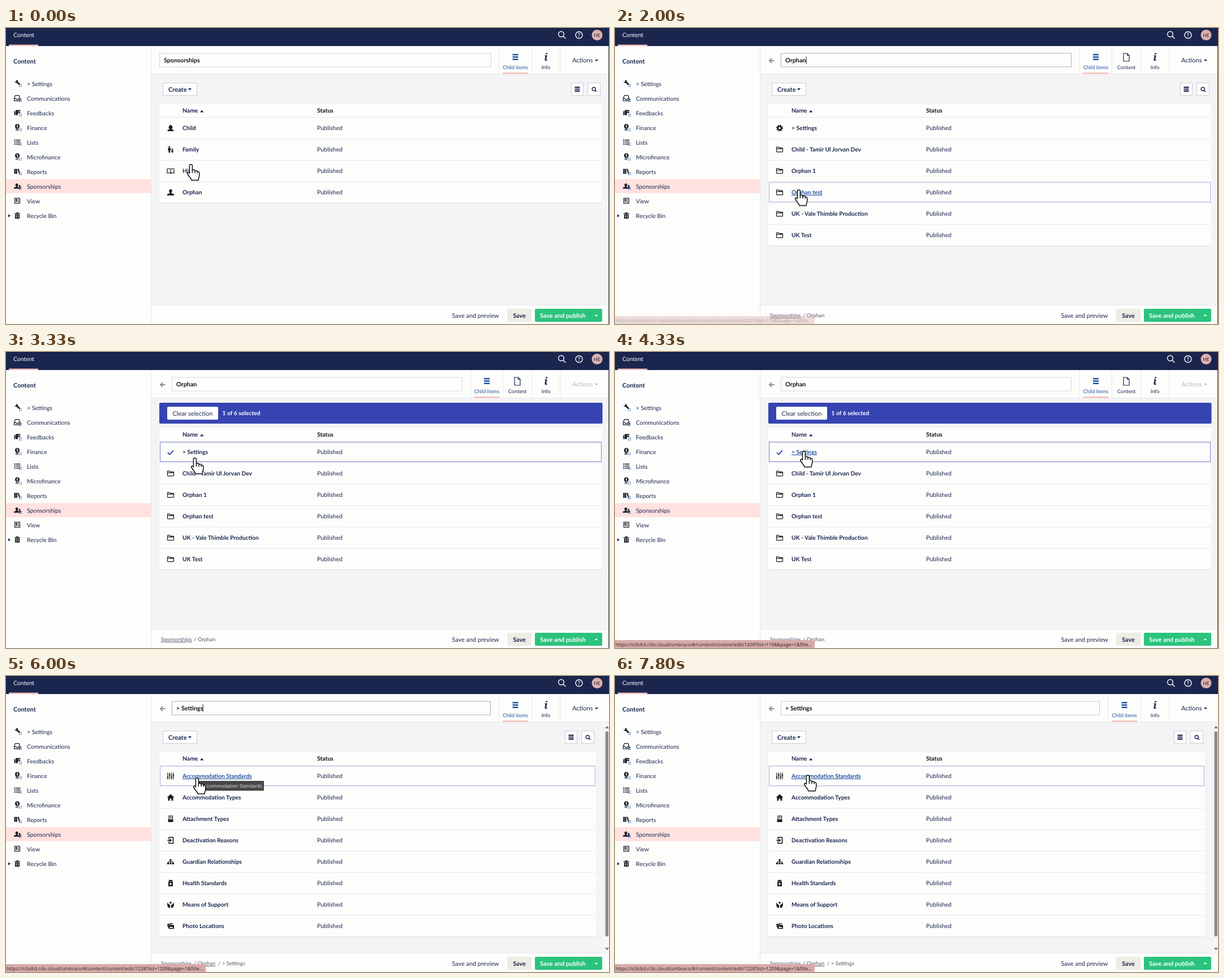
An HTML page that plays this animation: 1066x525 px, repeating every 8000 ms.

```html
<!DOCTYPE html>
<html lang="en">
<head>
<meta charset="utf-8">
<title>Content</title>
<style>
html, body { margin: 0; width: 100%; height: 100%; overflow: hidden; background: #fdfdfc; }
svg { display: block; width: 1066px; height: 525px; }
text { font-family: Lato, sans-serif; fill: #1b264f; text-rendering: geometricPrecision; white-space: pre; }
.b { font-weight: 700; }
.mid { text-anchor: middle; }
.ui { font-family: "Open Sans", "Noto Sans", sans-serif; }
.line { stroke: #e9e8ec; }
.box { fill: #fdfdfc; stroke: #cfced3; }
.input { fill: #fdfdfc; }
.ring { fill: none; stroke: #a8b1e0; visibility: hidden; }
.on .ring { visibility: visible; }
.link .name { fill: #2152a3; text-decoration: underline; }
.o { fill: none; stroke: #1b264f; stroke-width: 1.2; }
.hide { display: none; }
</style>
</head>
<body>
<svg id="stage" viewBox="0 0 1066 525"></svg>
<script>
const $ = id => document.getElementById(id);
const rect = (x, y, w, h, fill, extra = '') =>
  `<rect x="${x}" y="${y}" width="${w}" height="${h}" ${fill ? `fill="${fill}"` : ''} ${extra}/>`;
const text = (x, y, s, size, cls = '', extra = '') =>
  `<text x="${x}" y="${y}" font-size="${size}" class="${cls}" ${extra}>${s}</text>`;
const line = (x1, y1, x2, y2) => `<path class="line" d="M${x1} ${y1}L${x2} ${y2}"/>`;
const path = (d, extra = '') => `<path d="${d}" ${extra}/>`;
const at = (x, y, s, extra = '') => `<g transform="translate(${x} ${y})" ${extra}>${s}</g>`;
const outline = 'fill="none" stroke="#1a1a1f" stroke-width="1.2"';

const person = '<ellipse cy="-2.4" rx="2.7" ry="3.1"/><path d="M-1.5 0h3v1.6l4 1.4q.7 .5 .7 2.4h-12.4q0-1.9 .7-2.4l4-1.4z"/>';
const bars = path('M-4.5-4.5h9v2.2h-9zM-4.5-1.1h9v2.2h-9zM-4.5 2.3h9v2.2h-9z');
const glass = '<circle r="3" cx="-.8" cy="-.8" fill="none" stroke="#1b264f" stroke-width="1.4"/>' +
  path('M1.4 1.4L4 4', 'stroke="#1b264f" stroke-width="1.7"');
const coin = '<circle cy="-2" r="4"/>' + path('M-3 3h5M-3 5h5', 'stroke="#1a1a1f" stroke-width="1.2"') +
  path('M1-3.8h-1.6v1.6h1.6v1.8h-2M0-4.6v5', 'fill="none" stroke="#fdfdfc" stroke-width=".8"');

const icons = {
  person,
  coin,
  wrench: path('M-5-3.6l2 1.4 1.4-1.2-1-2.2q3.6-.4 3.8 3l4.2 4.4-1.9 1.9-4.3-4.3q-3.4 .2-4.2-3z'),
  tray: path('M-3.5-4.5h6.5l2 5.5v4h-10.5v-4zM-5.5 1h3l1 1.8h3l1-1.8h2.5', outline),
  feedback: path('M-5.5-2.5h2v7h-2zM-2.8-4.5h8v2.2h-4.2v1h4.2v2h-4.2v3.8h-3.8z'),
  list: path('M-5.5-4.5h2v2h-2zM-2.5-4.3h8v1.6h-8zM-5.5-1h2v2h-2zM-2.5-.8h8v1.6h-8zM-5.5 2.5h2v2h-2zM-2.5 2.7h8v1.6h-8z'),
  books: path('M-5.5-4.5h2.4v9h-2.4zM-2.5-4.5h2.4v9h-2.4zM.5-4l2.2-.6 2.4 8.4-2.2 .6z'),
  people: `<g transform="translate(-1 0) scale(.85)">${person}</g>` + path('M2.5-1.8h2.8v3h-2.8zM3 1.5h3v3h-3z'),
  news: rect(-4.5, -4.5, 9, 9, '', outline) + path('M-3-3h3v3h-3zM1-3h2v1h-2zM1-1h2v1h-2zM-3 1.2h6v1h-6z'),
  trash: path('M-5-4h3l.6-1.4h2.8l.6 1.4h3v1.4h-10zM-4-2h8v7.5h-8z') + path('M-1.6-.6v4.6M1.6-.6v4.6', 'stroke="#fdfdfc"'),
  family: '<circle cx="-2.2" cy="-4.4" r="1.6"/><circle cx="3" cy="-.4" r="1.4"/>' +
    path('M-4.6-2.4h4.8v4h-1v4h-2.8v-4h-1zM1.2 1.4h3.6v2.4h-.8v2h-2v-2h-.8z'),
  child: '<path d="M-3.4 1q0-6.6 3.4-6.6t3.4 6.6h-2v.8l4 1.6v2h-10.8v-2l4-1.6v-.8z"/>',
  book: path('M0-3q-2.5-2-6-.8v7.6q3.5-1.2 6 .6q2.5-1.8 6-.6v-7.6q-3.5-1.2-6 .8v7.4', outline),
  gear: '<circle r="3.2" fill="none" stroke="#1a1a1f" stroke-width="2.6"/><circle r="5.1" fill="none" stroke="#1a1a1f" stroke-width="1.8" stroke-dasharray="2 2"/>',
  folder: path('M-5.5 3.6v-7.2q0-.8 .8-.8h2.8l1.2 1.5h5.4q.8 0 .8 .8v5.7q0 .8-.8 .8h-9.4q-.8 0-.8-.8zM-5.5-1.4h11', outline),
  check: path('M-5 .4l3.4 3.4 6.6-7.2', 'fill="none" stroke="#2b3f9e" stroke-width="1.8"'),
  sliders: path('M-5-6v12M-1.6-6v12M1.7-6v12M5-6v12', 'stroke="#1a1a1f" stroke-width="1.2"') +
    path('M-6.3 1h2.6v2h-2.6zM-2.9-3h2.6v2h-2.6zM.4 1h2.6v2h-2.6zM3.7-2h2.6v2h-2.6z'),
  house: path('M0-6l6.5 6h-2v5.5h-3v-3.5h-3v3.5h-3v-5.5h-2z'),
  doc: path('M-3-5.5h6.5v7h-6.5z', outline) + path('M-1.5-3.5h3.5M-1.5-1.5h3.5', 'stroke="#1a1a1f"') + rect(-4.5, 1, 9, 4.5),
  exit: path('M-3-2.5v-2.7h7.5v10.4h-7.5v-2.7', 'fill="none" stroke="#1a1a1f" stroke-width="1.6"') + path('M-5.5-1h4v-2.3l3.7 3.3-3.7 3.3v-2.3h-4z'),
  tree: path('M-1.6-4.5h3.2v3h-3.2zM-6 1.5h3.2v3h-3.2zM-1.6 1.5h3.2v3h-3.2zM2.8 1.5h3.2v3h-3.2z') +
    path('M0-2v4M-4.4 2v-2h8.8v2', 'fill="none" stroke="#1a1a1f"'),
  pills: path('M-3.2-5.8h6.4v2.2h-6.4zM-4-3h8v8.6h-8z') + path('M0-.8v4M-2 1.2h4', 'stroke="#fdfdfc" stroke-width="1.4"'),
  hands: '<circle cx="0" cy="-3.4" r="1.8"/>' + path('M-5.5-4.5l1.6 3.2 3 2.2v4.8h-2.6l-2.4-4zM5.5-4.5l-1.6 3.2-3 2.2v4.8h2.6l2.4-4z'),
  photos: path('M-6-3.5l9.5-1.8 .5 1.6-8 1.6 1 4.6h-1.8z') + rect(-3.6, -2, 9.6, 7) +
    path('M-2.2 3.6l2.4-3 1.6 1.6 1-1 1.8 2.4z', 'fill="#fdfdfc"')
};

const dots = path('M3 2h1.6v1.6H3zM6 2h1.6v1.6H6zM3 5h1.6v1.6H3zM6 5h1.6v1.6H6z', 'fill="#2b6cc4"');
const menu = [['wrench', '&gt; Settings'], ['tray', 'Communications'], ['feedback', 'Feedbacks'], ['coin', 'Finance'],
  ['list', 'Lists'], ['coin', 'Microfinance'], ['books', 'Reports'], ['people', 'Sponsorships'], ['news', 'View'], ['trash', 'Recycle Bin']];

function sidebar() {
  return rect(0, 32, 257, 493, '#fdfdfc') + line(256.5, 32, 256.5, 525) + rect(0, 268, 256, 25, '#ffe1df') +
    text(13, 63, 'Content', 11, 'b') +
    menu.map(([icon, label], i) => {
      const y = 99 + i * 26.05;
      return at(20, y - 1, icons[icon] + (i < 8 ? dots : ''), 'fill="#1a1a1f"') + text(37, y + 3.7, label, 10.4);
    }).join('') + path('M4 330.3l4 2.7-4 2.7z', 'fill="#1b264f"');
}

function topBar() {
  return rect(0, 0, 1066, 32, '#1b264f') + rect(0, 0, 1066, 1, '#10183a') + rect(5, 29.5, 52, 2.5, '#f5c1bc') +
    text(13, 16.3, 'Content', 10.4, '', 'style="fill:#fff"') +
    '<g fill="none" stroke="#fff" stroke-width="1.4"><circle cx="981.5" cy="11" r="4.8"/><path d="M985 14.5l4.5 4.5"/><circle cx="1013" cy="12.5" r="6"/></g>' +
    text(1013, 16, '?', 9.5, 'b mid', 'style="fill:#fff"') +
    '<circle cx="1045" cy="12.5" r="9.5" fill="#deb2ac"/>' + text(1045, 15.7, 'HE', 8.6, 'mid');
}

function tab(x, label, active) {
  const icon = label === 'Info'
    ? text(0, 5.5, 'i', 18, 'b mid', 'style="font-family:\'Noto Serif\',serif;font-style:italic"')
    : label === 'Content' ? path('M-5-7h6.5l3.5 3.5v10.5h-10zM1.5-7v3.5h3.5', 'class="o"')
    : path('M-5-6h10v2.6h-10zM-5-1.8h10v2.6h-10zM-5 2.4h10v2.6h-10z', 'fill="#2152a3"');
  return at(x, 52, icon) + text(x, 72.5, label, 9.1, 'mid', active ? 'style="fill:#2152a3"' : '') +
    (active ? rect(x - 22.5, 79, 45, 2.5, '#f5c1bc') : '');
}

function row([icon, label], i, right) {
  const y = 158 + i * 38;
  return `<g class="row">${line(271, y + .5, right, y + .5)}${at(291, y + 19.5, icons[icon], 'fill="#1a1a1f" class="icon"')}` +
    text(312, y + 23, label, 10.25, 'b name') + text(550, y + 23, 'Published', 10.5) +
    rect(272.5, y + 2, right - 274, 34.5, '', 'class="ring"') + '</g>';
}

function page(id, { title, x, w, tabs, seps, rows, right, crumbs }) {
  const end = 158 + rows.length * 38, back = x > 280;
  return `<g id="${id}" class="page">` + rect(257, 32, 809, 50, '#fdfdfc') + line(257, 81.5, 1066, 81.5) +
    (back ? path('M281.5 58h-8M277 54l-4 4 4 4', 'fill="none" stroke="#8b8c9c" stroke-width="1.8"') : '') +
    rect(x + .5, 45, w, 24, '', 'class="input"') + text(x + 8, 61.2, title, 10.8, 'b', 'style="fill:#111"') +
    seps.map(s => line(s + .5, 32, s + .5, 81)).join('') + tabs.map(([cx, l], i) => tab(cx, l, !i)).join('') +
    `<g class="actions">${text(1001, 61.3, 'Actions', 11)}${path('M1041 56h6l-3 3.2z', 'fill="#1b264f"')}</g>` +
    rect(277.5, 97.5, 60, 22, '', 'class="box"') + text(287, 112.6, 'Create', 11, 'b') + path('M322 107h6l-3 3.4z', 'fill="#1b264f"') +
    rect(right - 54.5, 97.5, 21, 22, '', 'class="box"') + at(right - 44, 108.5, bars, 'fill="#1b264f"') +
    rect(right - 25.5, 97.5, 22, 22, '', 'class="box"') + at(right - 14, 109, glass) +
    rect(271, 136, right - 271, end - 135, '#dddce0', 'rx="2"') + rect(271, 135, right - 271, end - 135, '#fdfdfc', 'rx="2"') +
    text(312, 150.3, 'Name', 10.4, 'b') + path('M343 149.5h6.4l-3.2-4z', 'fill="#1b264f"') + text(550, 150.3, 'Status', 10.4, 'b', 'style="fill:#111"') +
    rows.map((r, i) => row(r, i, right)).join('') +
    rect(257, 491, 809, 34, '#fdfdfc') + line(257, 491.5, 1066, 491.5) + crumbs +
    text(788.5, 513.5, 'Save and preview', 10.85) + rect(886, 498, 43, 23, '#efebe5', 'rx="2"') + text(907.5, 513.5, 'Save', 10.9, 'b mid') +
    rect(935, 498, 119, 23, '#2bc37c', 'rx="2"') + text(944, 513.5, 'Save and publish', 10.9, 'b', 'style="fill:#fff"') +
    path('M1040.5 511h6l-3-3.2z', 'fill="#fff"') + '</g>';
}

const crumb = (x, s, last) => text(x, 513, s, 9.4, '', `style="fill:#55566a;${last ? '' : 'text-decoration:underline'}"`);
const folder = s => ['folder', s];
const pages = [
  page('p0', {
    title: 'Sponsorships', x: 271, w: 586, right: 1054, seps: [871, 929, 979], crumbs: '',
    tabs: [[900.5, 'Child items'], [954.5, 'Info']],
    rows: [['child', 'Child'], ['family', 'Family'], ['book', 'Hifz'], ['person', 'Orphan']]
  }),
  page('p1', {
    title: 'Orphan', x: 293, w: 513, right: 1054, seps: [821, 878, 929, 979],
    crumbs: crumb(274, 'Sponsorships') + crumb(332, '/', 1) + crumb(339, 'Orphan', 1),
    tabs: [[850, 'Child items'], [904, 'Content'], [954.5, 'Info']],
    rows: [['gear', '&gt; Settings'], folder('Child - Tamir Ul Jorvan Dev'), folder('Orphan 1'),
      folder('Orphan test'), folder('UK - Vale Thimble Production'), folder('UK Test')]
  }),
  page('p2', {
    title: '&gt; Settings', x: 293, w: 563, right: 1043, seps: [871, 929, 979],
    crumbs: crumb(274, 'Sponsorships') + crumb(332, '/', 1) + crumb(339, 'Orphan') + crumb(375, '/', 1) + crumb(382, '&gt; Settings', 1) +
      rect(1058, 83, 8, 408, '#f6f5f7') + rect(1059.5, 98, 5.5, 364, '#8b8b8d', 'rx="2.7"') +
      path('M1059 93h7l-3.5-4.5zM1059 482h7l-3.5 4.5z', 'fill="#77777a"'),
    tabs: [[900.5, 'Child items'], [954.5, 'Info']],
    rows: [['sliders', 'Accommodation Standards'], ['house', 'Accommodation Types'], ['doc', 'Attachment Types'], ['exit', 'Deactivation Reasons'],
      ['tree', 'Guardian Relationships'], ['pills', 'Health Standards'], ['hands', 'Means of Support'], ['photos', 'Photo Locations']]
  })
];

const tip = (id, x, y, w, s) => `<g id="${id}">${rect(x, y, w, 17.5, '#464646')}${text(x + 5.5, y + 12, s, 8.5, 'ui', 'style="fill:#f2f2f2"')}</g>`;

$('stage').innerHTML = rect(257, 32, 809, 493, '#f4f3f5') + pages.join('') +
  `<g id="picked">${rect(271, 90, 783.5, 37, '#3544b1', 'rx="2"')}${rect(285, 97, 90, 23, '#fff', 'rx="2"')}` +
  text(294.5, 112.6, 'Clear selection', 10.95) + text(382.5, 112.4, '1 of 6 selected', 10.3, 'b', 'style="fill:#fff"') +
  rect(283, 166, 16, 24, '#fdfdfc') + at(291, 178, icons.check) + '</g>' +
  rect(0, 50.5, 1, 13, '#111', 'id="caret"') + sidebar() + topBar() + rect(1065, 32, 1, 493, '#3a3c48', 'id="edge"') +
  `<g id="status"><path d="M0 511h350q3 0 3 3v11H0z" fill="#d8aaa7"/>${text(1, 521.5, '', 8.35, 'ui', 'id="url" style="fill:#26222a"')}</g>` +
  tip('tipA', 340, 186, 116, 'Accommodation Standards') + tip('tipB', 345, 229, 101, 'Accommodation Types') +
  '<path id="hand" d="M-2.6 2C-2.6-.8 2.4-.8 2.4 2V10C4 8.8 6.8 9.3 7 11.2C8.8 10 11 10.9 11.2 12.8C13 12 14.8 13 14.8 15V19C14.8 22.5 13.4 23.5 13 28H1C.6 25-3.4 21.5-6 17C-7.2 14.4-4.8 13-2.6 15.8ZM2.4 10v5M7 11.2v4M11.2 12.8v3" fill="#fff" stroke="#111" stroke-width="1.5" stroke-linejoin="round"/>';

const LOOP = 8000;
const clamp = v => Math.max(0, Math.min(1, v));
const ramp = (t, a, b) => clamp((t - a) / (b - a));
const within = (t, spans) => spans.some(([a, b]) => t >= a && t < b);
const latest = (t, keys) => keys.filter(k => k[0] <= t).pop();
const smooth = p => p * p * (3 - 2 * p);

// time, x, y of the fingertip
const route = [[0, 327, 242], [30, 327, 242], [240, 328, 221], [830, 325, 289], [900, 325, 287], [2200, 325, 287], [2720, 334, 186],
  [2960, 334, 188], [3960, 334, 188], [4330, 334, 176], [5860, 334, 176], [6000, 338, 181], [6500, 339, 219],
  [7030, 339, 219], [7560, 341, 176], [LOOP, 341, 176]];
const ids = [[0, 1196], [360, 1199], [860, 1198], [1900, 3023], [2330, 3022], [2500, 2958], [4100, 1209], [5300, 1228], [6280, 1229], [7330, 1228]];
const live = [[60, 1430], [1850, 4630], [5200, LOOP]];
const shown = [[0, 1430], [1670, 4630], [4900, LOOP]];
const focus = [null, [1670, 3060], [4900, 7760]];
const statusSpans = [[120, 1450], [1950, 2740], [4195, 4620], [5340, LOOP]];
const views = [0, 1, 2].map(i => {
  const el = $('p' + i);
  return { el, rows: [...el.querySelectorAll('.row')], input: el.querySelector('.input') };
});

function pointer(t) {
  const i = Math.max(1, route.findIndex(k => k[0] > t));
  const [a, x, y] = route[i - 1], [b, u, v] = route[i];
  const p = smooth(ramp(t, a, b));
  return [x + (u - x) * p, y + (v - y) * p];
}

const toggle = (el, visible) => el.classList.toggle('hide', !visible);

function draw(t) {
  const [x, y] = pointer(t);
  const hot = within(t, live) ? Math.floor((y - 158) / 38) : -1;
  const inText = (y - 158) % 38 > 10.5 && (y - 158) % 38 < 26.5;
  let caretX = 0;
  views.forEach((v, i) => {
    const [a, b] = shown[i];
    toggle(v.el, t >= a && t < b);
    v.el.style.opacity = i ? ramp(t, a - 40, a + 130) : 1;
    v.rows.forEach((r, n) => {
      r.classList.toggle('on', n === hot);
      r.classList.toggle('link', n === hot && inText);
    });
    const f = focus[i];
    const glow = f ? ramp(t, f[0], f[0] + 80) * (1 - ramp(t, f[1], f[1] + 60)) : 0;
    const grey = Math.round(214 - 38 * glow);
    v.input.style.stroke = `rgb(${grey},${grey},${grey + 3})`;
    if (f && t >= f[0] && t < f[1] && Math.floor((t - f[0]) / 530) % 2 === 0) caretX = i === 1 ? 337.5 : 347.5;
  });
  toggle($('caret'), caretX);
  $('caret').setAttribute('x', caretX);

  const picked = t >= 3300 && t < 4630;
  toggle($('picked'), picked);
  views[1].el.querySelector('.actions').style.opacity = picked ? .3 : 1;
  views[1].rows[0].querySelector('.ring').style.stroke = picked ? '#7682cc' : '';

  const list = t < 1900 ? 1461 : t < 4900 ? 1198 : 1209;
  $('url').textContent = `https://n3oltd.n3o.cloud/umbraco/#/content/content/edit/${latest(t, ids)[1]}?list=${list}&page=1&filte...`;
  $('status').style.opacity = Math.max(...statusSpans.map(([a, b]) => ramp(t, a, a + 130) * (1 - ramp(t, b, b + 180))));

  toggle($('edge'), t < 4900);
  toggle($('tipA'), within(t, [[5800, 6120]]));
  toggle($('tipB'), within(t, [[6860, 7110]]));
  $('hand').setAttribute('transform', `translate(${x.toFixed(2)} ${y.toFixed(2)})`);
}

const start = performance.now();
function tick() {
  draw((performance.now() - start) % LOOP);
  requestAnimationFrame(tick);
}
tick();
</script>
</body>
</html>
```
